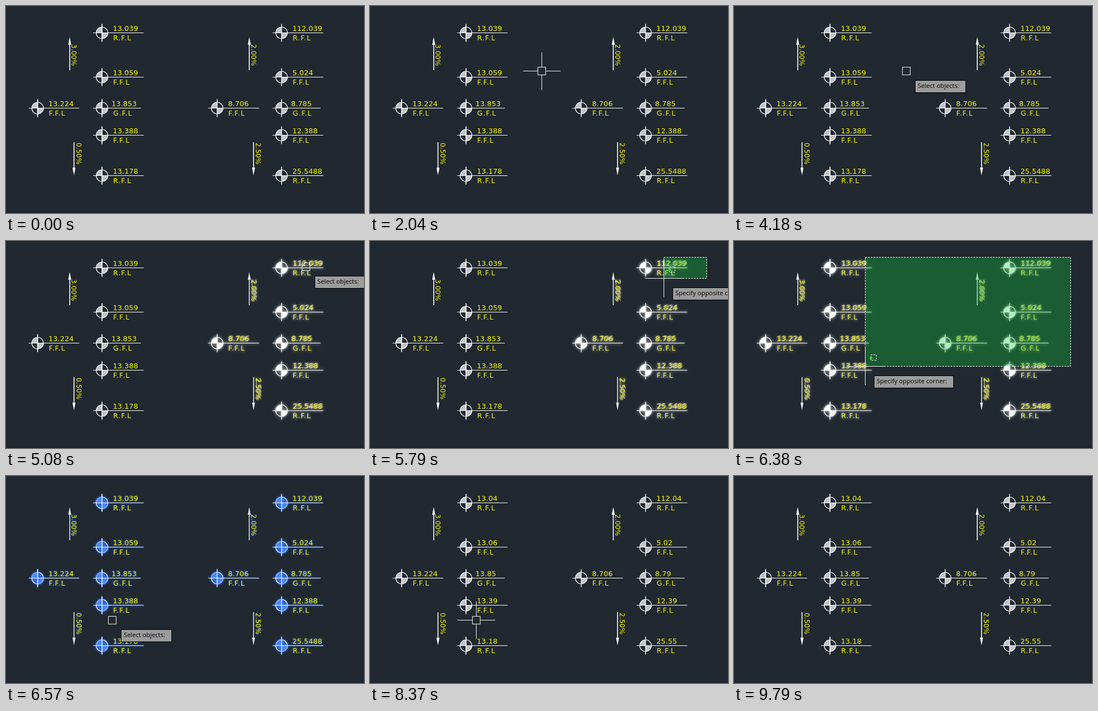
Recreate the animation shown at these times as an HTML page with a canvas. Size 645x374 px, loop 10 s.

```html
<!DOCTYPE html>
<html>
<head>
<meta charset="utf-8">
<style>
html, body { margin: 0; width: 100%; height: 100%; overflow: hidden; background: #212830; }
canvas { display: block; }
</style>
</head>
<body>
<canvas id="stage" width="645" height="374"></canvas>
<script>
const c = document.getElementById('stage').getContext('2d');
const LOOP = 10000, YELLOW = '#f6f600', WHITE = '#fff';
const CAD = '"DejaVu Sans", sans-serif', UI = '"Open Sans", sans-serif';
const STYLE = {
  normal: { glow: 'transparent', blur: 0, hatch: 'rgba(255,255,255,.5)', text: YELLOW },
  hover: { glow: '#fff', blur: 5, hatch: '#fff', text: '#f4f430' },
  selected: { glow: '#2f78ff', blur: 4, fill: '#3468c8', hatch: '#4a88ff', text: YELLOW }
};

// x, y, level, label (the first row is never rounded)
const rows = vals => [
  [57, 184, 'F.F.L'], [173, 48, 'R.F.L'], [173, 128, 'F.F.L'],
  [173, 184, 'G.F.L'], [173, 233, 'F.F.L'], [173, 306, 'R.F.L']
].map(([x, y, label], i) => ({ x, y, label, val: vals[i] }));
const groups = [
  { dx: 0, rows: rows([13.224, 13.039, 13.059, 13.853, 13.388, 13.178]), up: '3.00%', down: '0.50%' },
  { dx: 323.5, rows: rows([8.706, 112.039, 5.024, 8.785, 12.388, 25.5488]), up: '2.00%', down: '2.50%' }
];

// Cursor keys: time, x, y
const path = [
  [0, 480, 298], [120, 480, 298], [620, 347, 138], [830, 310, 99], [980, 310, 99],
  [1200, 353, 80], [1400, 335, 138], [1600, 288, 115], [1780, 300, 71], [1960, 310, 114],
  [2039, 310, 114], [2040, 309.5, 117.5], [4180, 310.5, 117.5], [4300, 310.5, 104],
  [4690, 310.5, 104], [5080, 540.5, 46.5], [5460, 606.5, 29.5], [5610, 606.5, 29.5],
  [6100, 296.5, 181.5], [6560, 191.5, 260.5], [8310, 191.5, 260.5], [8700, 540.5, 372.5],
  [LOOP, 540.5, 372.5]
];

function cursorAt(t) {
  const i = path.findIndex(k => k[0] > t);
  const [t0, x0, y0] = path[i - 1], [t1, x1, y1] = path[i];
  const n = Math.max(1, Math.round((t1 - t0) / 65));
  const u = Math.floor((t - t0) / (t1 - t0) * n) / n;
  return [x0 + (x1 - x0) * u, y0 + (y1 - y0) * u];
}

const between = (t, a, b) => t >= a && t < b;

function line(...p) {
  c.beginPath();
  for (let i = 0; i < p.length; i += 4) {
    c.moveTo(p[i], p[i + 1]);
    c.lineTo(p[i + 2], p[i + 3]);
  }
  c.stroke();
}

function text(s, x, y, size, color, family = CAD) {
  c.font = `${size}px ${family}`;
  c.fillStyle = color;
  c.fillText(s, x, y);
}

function glow(style) {
  c.shadowColor = style.glow;
  c.shadowBlur = style.blur;
}

function noGlow() {
  c.shadowColor = 'transparent';
}

function symbol(x, y, end, style) {
  const r = 10.5;
  glow(style);
  c.strokeStyle = WHITE;
  c.lineWidth = 1.2;
  c.beginPath();
  c.arc(x, y, r, 0, 7);
  if (style.fill) {
    c.fillStyle = style.fill;
    c.fill();
  }
  c.stroke();
  line(x - 16, y, end, y, x, y - 16, x, y + 16);
  for (const q of [1, -1]) {
    c.fillStyle = style.hatch;
    c.beginPath();
    c.moveTo(x, y);
    c.arc(x, y, r - 0.5, q > 0 ? 0 : Math.PI, q > 0 ? Math.PI / 2 : Math.PI * 1.5);
    c.fill();
    if (style.blur) continue;
    c.lineWidth = 0.9;
    for (let d = 2; d < r; d += 2) line(x + q * d, y, x + q * d, y + q * Math.sqrt(r * r - d * d));
  }
  noGlow();
  c.lineWidth = 1.2;
  line(x - 16, y, end, y, x, y - 16, x, y + 16);
}

function label(s, x, y, size, style, spacing = 0) {
  c.letterSpacing = spacing + 'px';
  glow(style);
  text(s, x, y, size, style.text);
  noGlow();
  // The hover highlight shows numbers smeared
  if (style === STYLE.hover && !spacing) text(s, x + 2, y - 1, size, 'rgba(235,235,150,.7)');
  c.letterSpacing = '0px';
}

function arrow(x, tip, dir, s, textX, textY, style) {
  c.strokeStyle = c.fillStyle = style.blur ? '#dfe3e8' : WHITE;
  c.lineWidth = 1.6;
  line(x, tip + dir * 10, x, tip + dir * 60);
  c.beginPath();
  c.moveTo(x, tip);
  c.lineTo(x - 2.7, tip + dir * 14);
  c.lineTo(x + 2.7, tip + dir * 14);
  c.fill();
  c.save();
  c.translate(textX, textY);
  c.rotate(Math.PI / 2);
  label(s, 0, 0, 12.3, style);
  c.restore();
}

function drawGroup(g, style, rounded) {
  c.save();
  c.translate(g.dx, 0);
  g.rows.forEach(({ x, y, val, label: name }, i) => {
    const mid = name[0] === 'G';
    const s = rounded && i ? (val + 1e-6).toFixed(2) : String(val);
    symbol(x, y + 0.5, x + (mid ? 70 : 75), style);
    label(s, x + (mid ? 17 : 19.5), y - 3, 13, style);
    label(name, x + 20, y + 13.5, 12.7, style, 0.9);
  });
  arrow(114.8, 56, 1, g.up, 118.2, 69, style);
  arrow(122.5, 306, -1, g.down, 126.7, 247, style);
  c.restore();
}

function box(x, y, w, h, fill, stroke) {
  c.fillStyle = fill;
  c.fillRect(x, y, w, h);
  c.strokeStyle = stroke;
  c.lineWidth = 1;
  c.strokeRect(x, y, w, h);
}

function tooltip(s, x, y, w) {
  box(x + 16, y + 17, w, 22, '#9c9c9c', '#000');
  text(s, x + 20.5, y + 30, 11.3, '#000', UI);
}

function crosshair(x, y, gap) {
  line(x - 34, y, x - gap, y, x + gap, y, x + 34, y, x, y - 34, x, y - gap, x, y + gap, x, y + 34);
}

function pickWindow(x, y) {
  const x0 = 606.5, y0 = 29.5;
  c.fillStyle = 'rgba(15,205,55,.32)';
  c.fillRect(x, y, x0 - x, y0 - y);
  c.strokeStyle = WHITE;
  c.lineWidth = 1;
  c.setLineDash([3, 2]);
  c.strokeRect(x, y, x0 - x, y0 - y);
  c.strokeRect(x + 10, y - 21, 10, 10);
  c.setLineDash([]);
  c.fillStyle = '#35d435';
  c.beginPath();
  c.arc(x + 10.5, y - 15.5, 2.5, 0, 7);
  c.fill();
}

function drawCursor(t) {
  if (t < 120 || between(t, 640, 830) || t >= 9790) return;
  const [x, y] = cursorAt(t).map(v => Math.floor(v) + 0.5);
  const corner = between(t, 5670, 6570);
  const picking = between(t, 3235, 7280);
  if (corner) pickWindow(x, y);
  c.strokeStyle = '#f4f4f4';
  c.lineWidth = 1;
  if (!corner) c.strokeRect(x - 7, y - 7, 14, 14);
  if (!picking || corner) crosshair(x, y, corner ? 0 : 7);
  if (between(t, 2560, 3210)) {
    box(x + 16, y + 17, 41, 18, '#e4e4e4', '#6c7076');
    text(t < 2690 ? '' : t < 2930 ? 'R' : 'RD', x + 20, y + 30, 11.3, '#111', UI);
  }
  if (picking) tooltip(corner ? 'Specify opposite corner:' : 'Select objects:', x, y, corner ? 143 : 91);
}

function draw(t) {
  c.fillStyle = '#212830';
  c.fillRect(0, 0, 645, 374);
  c.fillStyle = '#20242e';
  c.fillRect(0, 371, 645, 3);
  const selected = between(t, 6570, 7280);
  const hovers = [
    between(t, 6320, 6570),
    between(t, 5020, 5300) || between(t, 5735, 6570)
  ];
  groups.forEach((g, i) => {
    const style = selected ? STYLE.selected : hovers[i] ? STYLE.hover : STYLE.normal;
    drawGroup(g, style, t >= 7280);
  });
  drawCursor(t);
}

const start = performance.now();
function tick() {
  draw((performance.now() - start) % LOOP);
  requestAnimationFrame(tick);
}
tick();
</script>
</body>
</html>
```
